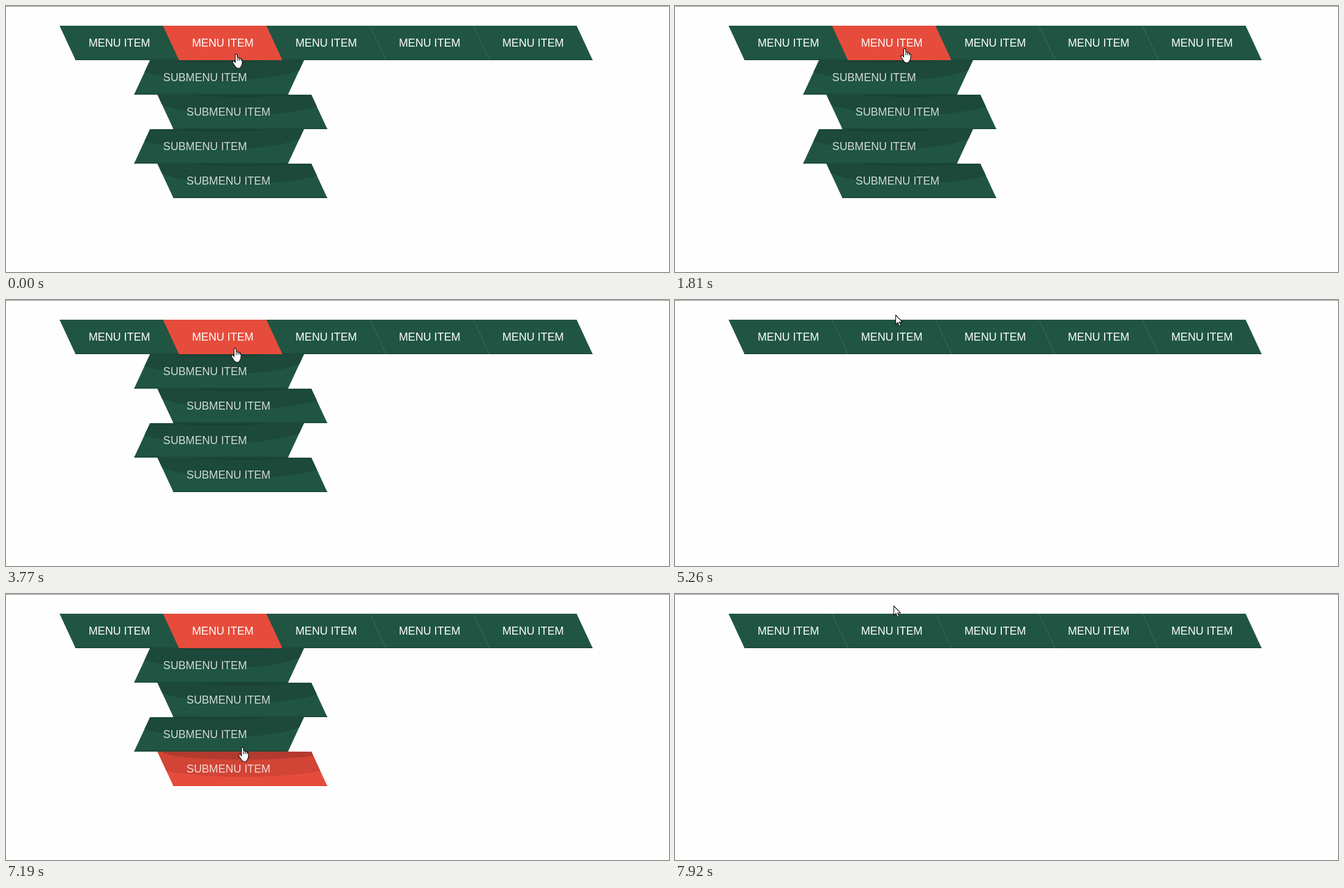
Recreate the animation shown at these times as an HTML page with a canvas. Size 1077 by 432 pixels, loop 8000 ms.

```html
<!DOCTYPE html>
<html lang="en">
<head>
<meta charset="utf-8">
<title>Skewed menu</title>
<style>
html, body { margin: 0; height: 100%; overflow: hidden; background: #fefefe }
canvas { display: block }
</style>
</head>
<body>
<canvas id="stage" width="1077" height="432"></canvas>
<script>
const ctx = document.getElementById('stage').getContext('2d');
const LOOP = 8000, ROW = 56, SLANT = 26;
const GREEN = { base: '#205543', band: '#1c4939', inner: '#194234', edge: '#1d4c3c', bandSize: [150, 33], innerSize: [75, 4] };
const RED = { base: '#e64c3c', band: '#d14436', inner: '#b43a2f', edge: '#e64c3c', bandSize: [200, 41], innerSize: [130, 13] };

const TICKS = [0, 1210, 2450, 4400, 5130, 5260, 6110, 7320];
// Spans during which the submenu is out
const OPEN = [[-500, 360], [1450, 2690], [3410, 4640], [5380, 7920]];
// Pointer tip: time, x, y
const PATH = [
  [0, 374, 78], [120, 373, 64], [360, 371, 26], [600, 370, 10], [840, 371, -6], [960, 371, -24], [1209, 369, -24],
  [1210, 369, -8], [1330, 370, 20], [1450, 371, 44], [1930, 373, 77], [2330, 373, 77], [2450, 372, 60],
  [2570, 371, 40], [2690, 370, 22], [2930, 369, -6], [3170, 369, 1], [3290, 370, 20], [3410, 371, 46],
  [3770, 372, 78], [4280, 372, 78], [4400, 370, 62], [4520, 368, 40], [4640, 365, 20], [4760, 362, 0],
  [4880, 361, -24], [5129, 360, -24], [5130, 359, 0], [5260, 358, 24], [5380, 357, 50], [5860, 355, 118],
  [6110, 356, 163], [6710, 376, 257], [6950, 384, 291], [7070, 385, 276], [7190, 384, 249],
  [7320, 378, 215], [7560, 366, 110], [7680, 360, 72], [7800, 357, 40], [7920, 355, 19], [8000, 355, 19]
];

function tick(t) {
  const start = TICKS.filter(s => s <= t).pop();
  return start + Math.floor((t - start) / 120) * 120;
}

function pointer(t) {
  const i = Math.max(1, PATH.findIndex(k => k[0] >= t));
  const [t0, x0, y0] = PATH[i - 1], [t1, x1, y1] = PATH[i];
  const f = Math.max(0, (t - t0) / (t1 - t0));
  return { x: Math.round(x0 + (x1 - x0) * f), y: Math.round(y0 + (y1 - y0) * f) };
}

function poly(points) {
  ctx.beginPath();
  for (let i = 0; i < points.length; i += 2) ctx.lineTo(points[i], points[i + 1]);
  ctx.closePath();
}

function dome(x, y, [rx, ry], color) {
  ctx.fillStyle = color;
  ctx.beginPath();
  ctx.ellipse(x, y, rx, ry, 0, 0, Math.PI);
  ctx.fill();
}

// Slanted box; lean is +1 for "\" sides, -1 for "/" sides
function box(x, y, w, lean, skin, shaded) {
  const top = lean > 0 ? 0 : SLANT, foot = SLANT - top;
  ctx.save();
  poly([x + top, y, x + top + w, y, x + foot + w, y + ROW, x + foot, y + ROW]);
  ctx.fillStyle = skin.base;
  ctx.fill();
  ctx.clip();
  if (shaded) {
    const mid = x + (w + SLANT) / 2;
    dome(mid, y, skin.bandSize, skin.band);
    dome(mid, y, skin.innerSize, skin.inner);
  }
  ctx.fillStyle = skin.edge;
  ctx.fillRect(x, y + ROW - 2, w + SLANT, 2);
  ctx.restore();
}

function label(text, x, y, color) {
  ctx.fillStyle = color;
  ctx.fillText(text, x, y);
}

function drawMenu(active) {
  for (let i = 0; i < 5; i++) {
    const x = 87 + i * 168, lit = active && i === 1;
    box(x, 32, 168 + (i < 4), 1, lit ? RED : GREEN);
    label('MENU ITEM', x + 47.3, 66, '#fff');
  }
  ctx.strokeStyle = '#45735f';
  ctx.lineWidth = 0.8;
  for (let i = active ? 3 : 1; i < 5; i++) {
    const x = 87 + i * 168;
    ctx.beginPath();
    ctx.moveTo(x + 0.3, 32);
    ctx.lineTo(x + SLANT + 0.3, 32 + ROW);
    ctx.stroke();
  }
}

function drawSubmenu(alpha, hot) {
  ctx.globalAlpha = alpha;
  for (let i = 0; i < 4; i++) {
    const odd = i % 2, x = odd ? 246 : 208, y = 88 + i * ROW;
    box(x, y, 250, odd ? 1 : -1, i === hot ? RED : GREEN, true);
    label('SUBMENU ITEM', x + 47.3, y + 34, 'rgba(255,255,255,.8)');
  }
  ctx.globalAlpha = 1;
}

function drawPointer({ x, y }, hand) {
  ctx.save();
  ctx.translate(x, y);
  ctx.fillStyle = '#fff';
  ctx.strokeStyle = '#111';
  ctx.lineWidth = 1.1;
  ctx.lineJoin = 'round';
  if (hand) {
    poly([-1.5, 1, 0, 0, 1.5, 1, 2, 6, 4, 6, 5, 7, 7, 7, 8, 8, 9.5, 9, 10, 11,
      9.5, 17, 8, 20, 6, 23, 1, 23, -1, 21, -5, 15, -6, 12, -4, 11, -1.5, 14]);
  } else {
    poly([0.5, 0.5, 0.5, 16, 4, 12.5, 6.5, 18.5, 9, 17.5, 6.5, 11.8, 11.5, 11.8]);
  }
  ctx.fill();
  ctx.stroke();
  if (hand) {
    ctx.beginPath();
    for (const dx of [2, 5, 8]) {
      ctx.moveTo(dx, 7);
      ctx.lineTo(dx, 11);
    }
    ctx.stroke();
  }
  ctx.restore();
}

function draw(t) {
  const now = tick(t), tip = pointer(now);
  const span = OPEN.find(([a, b]) => now >= a && now < b);
  // Hover trails the pointer slightly
  const hot = Math.floor((pointer(now - 60).y - 88) / ROW);
  ctx.fillStyle = '#fefefe';
  ctx.fillRect(0, 0, 1077, 432);
  ctx.fillStyle = '#8c8c8c';
  ctx.fillRect(0, 0, 1077, 1);
  ctx.font = '17.8px "Liberation Sans", Arial, sans-serif';
  drawMenu(!!span);
  if (span) drawSubmenu(Math.min(1, (now - span[0] + 120) / 360), hot);
  drawPointer(tip, !!span);
}

function loop() {
  draw(performance.now() % LOOP);
  requestAnimationFrame(loop);
}
loop();
</script>
</body>
</html>
```
